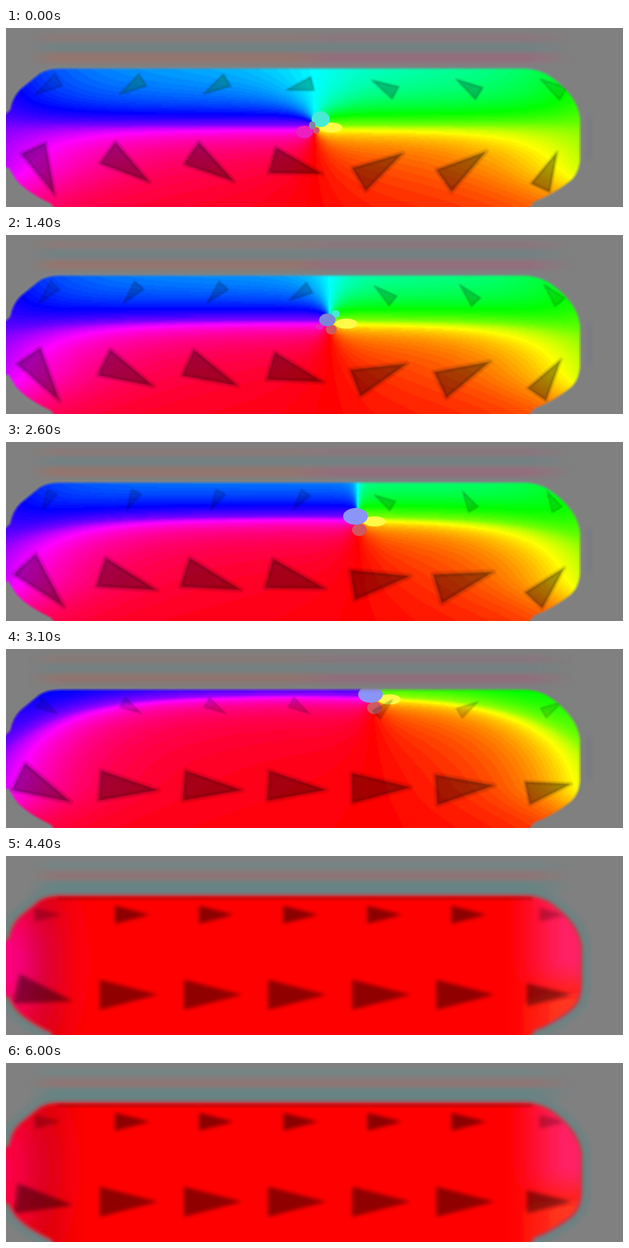
An HTML page with a canvas that plays this animation: 1100 by 320 pixels, repeating every 6100 ms.

```html
<!DOCTYPE html>
<html lang="en">
<head>
<meta charset="utf-8">
<title>Vortex core expulsion</title>
<style>
html, body { margin: 0; width: 100%; height: 100%; overflow: hidden; background: #808080; }
canvas { display: block; width: 1100px; height: 320px; }
</style>
</head>
<body>
<canvas id="stage" width="1100" height="320"></canvas>
<script>
const W = 1100, H = 320, LOOP = 6100, STEP = 100, CELL = 2;
const ctx = document.getElementById('stage').getContext('2d');
const cells = document.createElement('canvas');
cells.width = W / CELL;
cells.height = H / CELL;
const cellCtx = cells.getContext('2d');
const image = cellCtx.createImageData(cells.width, cells.height);

const outline = new Path2D('M-20 152 L0 151 L6 145 Q10 123 25 108 L58 81 Q72 71 98 71 L920 71 ' +
  'Q952 71 975 88 Q1021 122 1025 162 L1025 236 Q1023 260 1008 274 Q978 298 942 312 L930 330 ' +
  'L92 330 L78 315 Q22 288 10 262 L4 252 L-20 248 Z');

const clamp = (v, a = 0, b = 1) => Math.min(b, Math.max(a, v));
const mix = (a, b, t) => a + (b - a) * t;
const ramp = (a, b, v) => { const t = clamp((v - a) / (b - a)); return t * t * (3 - 2 * t); };
const bell = (v, mid, width) => Math.exp(-(((v - mid) / width) ** 2));
const lean = (d, reach) => d / Math.sqrt(d * d + reach * reach);

// The core drifts right and up, then is driven out through the top edge.
function stateAt(t) {
  const drift = t / 2600, push = Math.max(0, t - 2600) / 100;
  const calm = ramp(3050, 3400, t);
  return {
    t, calm,
    drift: clamp(drift),
    turned: ramp(2700, 3300, t),
    cx: 550 + 77 * drift ** 1.7,
    cy: 178 - 41 * drift - 1.76 * push * push,
    wall: 18 * (1 - t / 9000) * (1 - calm) + 0.3,
    spread: Math.max(0.15, 1.4 * (1 - t / 2800)),
    tilt: -46 * Math.exp(-Math.max(0, t - 3400) / 2600)
  };
}

// Signed angle of the swirling field, in degrees.
function swirlAngle(x, y, s) {
  const end = Math.exp(-Math.max(0, Math.min(x, 1025 - x)) / 110) * (1 - 0.6 * ramp(240, 330, y));
  const u = y - mix(s.cy - 4, 178, end);
  const slope = u > 0
    ? 90 / (1 + u / (s.wall * (1 + 3 * end)))
    : 90 + 72 * (1 - Math.exp(u / 38));
  const angle = (90 + (slope - 90) * (1 - 0.62 * end)) * Math.PI / 180;
  const dy = y - s.cy;
  const side = lean(x - s.cx, 4 + Math.abs(dy) * (dy < 0 ? s.spread : 0.8));
  return Math.atan2(Math.sin(angle) * side, Math.cos(angle)) * 180 / Math.PI;
}

const channel = (h, shift) => clamp(Math.abs((h / 60 + shift) % 6 - 3) - 1);

function paintField(s) {
  const data = image.data;
  let p = 0;
  for (let y = 1; y < H; y += CELL) {
    const rightTurn = mix(-18, 6, ramp(180, 270, y));
    const leftTurn = s.tilt * bell(y, 190, 130);
    for (let x = 1; x < W; x += CELL) {
      const rightEnd = ramp(880, 1010, x);
      const settled = leftTurn * bell(x, 0, 85) + rightTurn * rightEnd;
      const swirl = s.calm < 1 ? swirlAngle(x, y, s) : 0;
      const hue = (Math.round(mix(swirl, settled, s.calm) / 3) * 3 + 360) % 360;
      const value = 255 * (1 - 0.12 * s.calm * bell(x, 70, 45));
      const pale = 0.13 * s.calm * rightEnd;
      for (const shift of [0, 4, 2]) data[p++] = value * mix(channel(hue, shift), 1, pale);
      data[p++] = 255;
    }
  }
  cellCtx.putImageData(image, 0, 0);
}

function band(y, h, left, right, alpha) {
  const g = ctx.createLinearGradient(40, 0, 1010, 0);
  g.addColorStop(0, `rgba(${left},0)`);
  g.addColorStop(0.05, `rgba(${left},1)`);
  g.addColorStop(0.48, `rgba(${left},1)`);
  g.addColorStop(0.56, `rgba(${right},1)`);
  g.addColorStop(0.92, `rgba(${right},1)`);
  g.addColorStop(1, `rgba(${right},0)`);
  ctx.globalAlpha = alpha;
  ctx.fillStyle = g;
  ctx.fillRect(40, y, 970, h);
}

function paintBackdrop({ calm }) {
  const swirl = 1 - calm;
  ctx.globalAlpha = 1;
  ctx.fillStyle = '#808080';
  ctx.fillRect(0, 0, W, H);
  ctx.filter = 'blur(3px)';
  band(11, 14, '138,122,119', '138,118,126', swirl);
  band(27, 15, '115,129,131', '115,129,131', swirl);
  band(45, 17, '147,117,110', '147,110,124', swirl);
  ctx.globalAlpha = swirl * 0.4;
  ctx.fillStyle = '#70708e';
  ctx.fillRect(1036, 155, 8, 80);
  ctx.globalAlpha = calm * 0.7;
  ctx.strokeStyle = '#698282';
  ctx.lineWidth = 34;
  ctx.stroke(outline);
  band(10, 12, '117,132,132', '117,132,132', calm);
  band(28, 15, '142,117,117', '142,117,117', calm);
  band(46, 20, '104,131,131', '104,131,131', calm);
  ctx.filter = 'none';
  ctx.globalAlpha = 1;
}

function blob(x, y, rx, ry, colour) {
  ctx.fillStyle = colour;
  ctx.beginPath();
  ctx.ellipse(x, y, rx, ry, 0, 0, Math.PI * 2);
  ctx.fill();
}

// A pale centre grows while the patches above and to its left shrink.
function paintCore({ cx, cy, drift }) {
  if (cy < 60) return;
  const fade = 1 - drift;
  blob(cx + 30, cy + 5 * drift, 20, 9, 'hsl(58 100% 64%)');
  blob(cx + 11, cy - 15, 16 * fade, 14 * fade, 'hsl(172 80% 60%)');
  blob(cx - 18, cy + 8, 15 * fade, 11 * fade, 'hsl(313 84% 52%)');
  blob(cx + 3, cy + 5 + 15 * drift, mix(6, 13, drift), mix(6, 11, drift), 'hsl(356 55% 58%)');
  blob(cx - 4, cy - 4, mix(6, 22, drift), mix(7, 15, drift), `hsl(235 ${mix(10, 90, drift)}% ${mix(56, 76, drift)}%)`);
}

function arrow(x, y, turn, size, fill, alpha, calm) {
  ctx.save();
  ctx.translate(x, y);
  ctx.rotate(turn * Math.PI / 180);
  ctx.scale(size, size);
  ctx.beginPath();
  ctx.moveTo(-50, -27);
  ctx.lineTo(-50, 27);
  ctx.lineTo(54, 0);
  ctx.closePath();
  ctx.filter = `blur(${1 + 2.5 * calm}px)`;
  ctx.globalAlpha = alpha;
  ctx.fillStyle = fill;
  ctx.fill();
  ctx.globalAlpha = 0.12 * (1 - calm);
  ctx.lineJoin = 'round';
  ctx.lineWidth = 10;
  ctx.strokeStyle = '#000';
  ctx.stroke();
  ctx.restore();
}

function paintArrows(s) {
  const { t, calm, drift, turned } = s;
  const tint = 1 - clamp(t / 900);
  const teal = `rgb(0,${Math.round(110 * tint)},${Math.round(70 * tint)})`;
  for (let i = 0; i < 7; i++) {
    const x = 67 + 150 * i, end = i === 0 || i === 6;
    const side = lean(x - s.cx, 70);

    const rest = i === 0 ? -0.4 * s.tilt : 0;
    const lower = -side * (mix(36, 18, drift) + (end ? 30 : 0));
    const size = mix(0.88, 1, drift) * (i === 6 ? 0.77 : 1);
    arrow(x, end ? mix(255, 248, turned) : 248, mix(lower, rest, turned), size, '#000',
      mix(0.35, 0.43, calm), calm);

    const upper = 180 + side * mix(33, 63, drift);
    const upperSize = mix(mix(0.46, 0.36, drift), end ? 0.46 : 0.6, calm);
    const shade = mix(0.25, 0.16, drift) + 0.18 * tint;
    arrow(x + 7, 105, mix(upper, side < 0 ? 0 : 360, turned), upperSize, end ? '#000' : teal,
      end ? mix(0.12, 0.25, calm) : mix(shade, 0.45, calm), calm);
  }
}

function paintEdge({ calm }) {
  ctx.filter = 'blur(1px)';
  ctx.globalAlpha = 0.6 * (1 - calm);
  ctx.strokeStyle = '#808488';
  ctx.lineWidth = 6;
  ctx.stroke(outline);
  ctx.filter = 'blur(2px)';
  ctx.globalAlpha = 0.75 * calm;
  ctx.strokeStyle = '#be404c';
  ctx.lineWidth = 7;
  ctx.stroke(outline);
  ctx.globalAlpha = 0.4 * calm;
  ctx.fillStyle = '#600';
  ctx.fillRect(92, 74, 846, 4);
  ctx.filter = 'none';
  ctx.globalAlpha = 1;
}

function paint(t) {
  const s = stateAt(t);
  paintBackdrop(s);
  paintField(s);
  ctx.save();
  ctx.clip(outline);
  ctx.drawImage(cells, 0, 0, W, H);
  paintCore(s);
  paintArrows(s);
  ctx.restore();
  paintEdge(s);
}

const start = performance.now();
let shown = -1;
function tick() {
  const t = Math.max(0, performance.now() - start) % LOOP;
  const step = Math.floor(t / STEP);
  if (step !== shown) {
    shown = step;
    paint(step * STEP);
  }
  requestAnimationFrame(tick);
}
tick();
</script>
</body>
</html>
```
